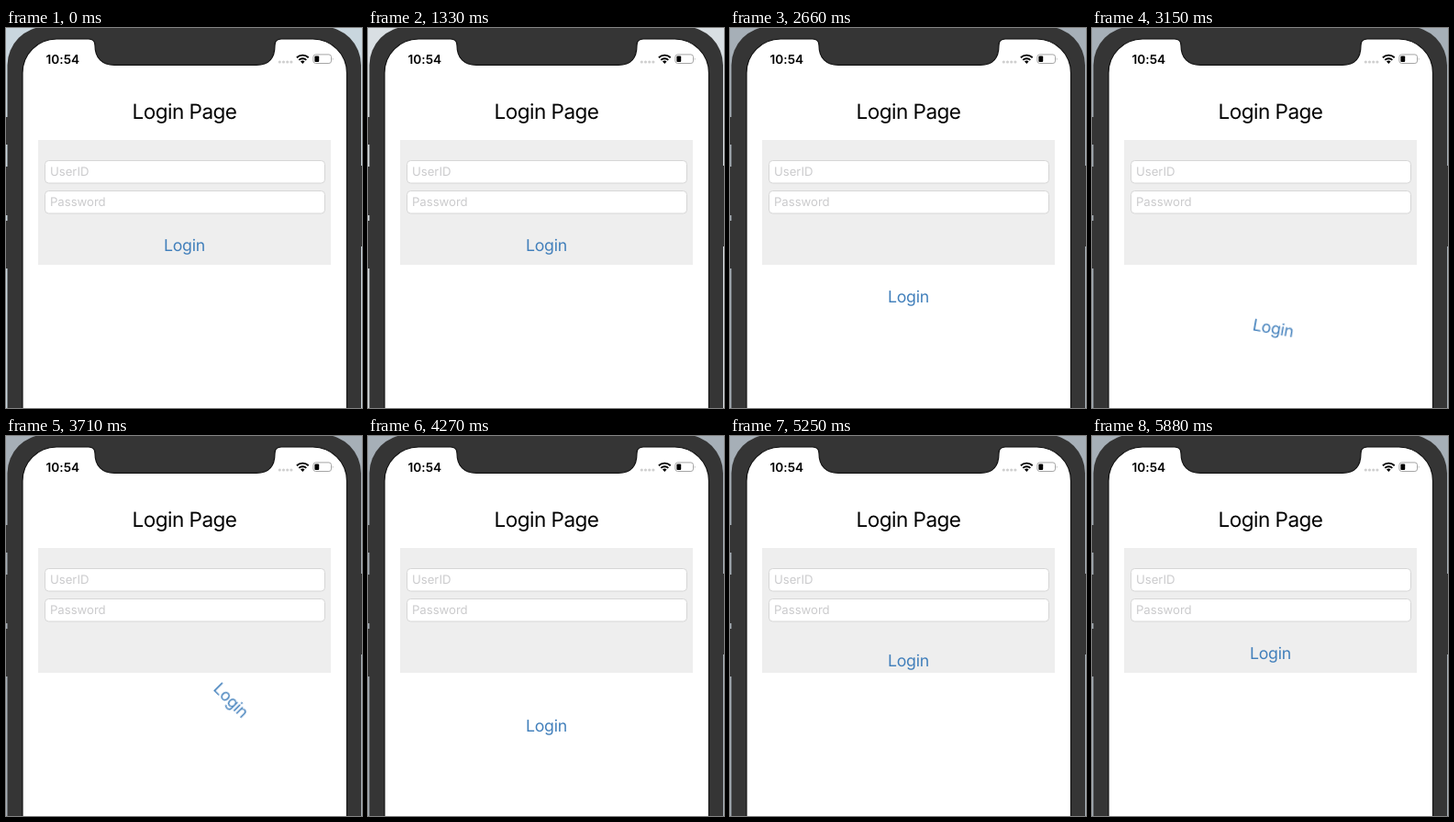
An HTML page for the animation above (6.65 s loop, 388 px wide and 414 px high).

```html
<!DOCTYPE html>
<html lang="en">
<head>
<meta charset="utf-8">
<title>Login button animation</title>
<style>
  html, body { margin: 0; width: 100%; height: 100%; overflow: hidden; background: #a6afb7; }
  svg { display: block; width: 388px; height: 414px; }
  text { font-family: Inter, "Liberation Sans", sans-serif; text-rendering: geometricPrecision; }
  .time { font-size: 13.6px; font-weight: 600; letter-spacing: .05px; }
  .title { font-size: 22.5px; letter-spacing: -.5px; text-anchor: middle; }
  .hint { font-size: 13.2px; letter-spacing: -.05px; fill: #cbcbcd; }
  .button { font-size: 17.7px; letter-spacing: -.25px; text-anchor: middle; fill: #417fbb; }
  .field { fill: #fff; stroke: #d6d6d6; }
</style>
</head>
<body>
<svg viewBox="0 0 388 414">
  <defs>
    <clipPath id="screen"><rect x="18" y="12" width="353.5" height="402"/></clipPath>
  </defs>

  <rect id="backdrop" width="388" height="414"/>

  <!-- phone body, side buttons, screen with notch -->
  <g fill="#353535">
    <rect x="1.5" y="-1.5" width="385.5" height="520" rx="42"/>
    <rect x="0" y="97" width="4" height="30"/>
    <rect x="0" y="151" width="4" height="53"/>
    <rect x="0" y="210" width="4" height="52"/>
    <rect x="385" y="150" width="3" height="88"/>
  </g>
  <path fill="#fff" stroke="#141414" stroke-width="1.200" d="M18 420V49A37 37 0 0 1 55 12H90Q97 12 97 19
    C97 33 105 40.300 118 40.300H273C286 40.300 293 33 293 19Q293 12 300 12H334.500A37 37 0 0 1 371.500 49V420Z"/>

  <!-- status bar -->
  <text class="time" x="43.500" y="39">10:54</text>
  <g fill="#d0d0d0">
    <circle cx="298.300" cy="37" r="1.600"/>
    <circle cx="302.500" cy="37" r="1.600"/>
    <circle cx="306.700" cy="37" r="1.600"/>
    <circle cx="310.900" cy="37" r="1.600"/>
  </g>
  <g fill="none" stroke="#000" stroke-width="1.900">
    <path d="M316.900 32.200A9.200 9.200 0 0 1 329.700 32.200"/>
    <path d="M319.300 34.900A5.600 5.600 0 0 1 327.300 34.900"/>
  </g>
  <path d="M323.300 39L321 36.600A3.300 3.300 0 0 1 325.600 36.600Z"/>
  <rect x="334.900" y="28.900" width="19.600" height="9.600" rx="2.600" fill="none" stroke="#a5a5a5"/>
  <rect x="336.400" y="30.400" width="4.800" height="6.600" rx="1"/>
  <path fill="#a5a5a5" d="M355.800 32Q357.400 33.700 355.800 35.400Z"/>

  <!-- form -->
  <text class="title" x="194.500" y="98.700">Login Page</text>
  <rect x="35" y="122" width="319" height="136" fill="#eee"/>
  <rect class="field" x="42.500" y="144.500" width="305" height="24.500" rx="4"/>
  <rect class="field" x="42.500" y="177.500" width="305" height="24.500" rx="4"/>
  <text class="hint" x="48" y="161.300">UserID</text>
  <text class="hint" x="48" y="194.300">Password</text>

  <g clip-path="url(#screen)">
    <g id="login"><text class="button" y="5">Login</text></g>
  </g>
</svg>
<script>
  const LOOP = 6650, TICK = 70, START = 1540, LENGTH = 4200;

  const pose = (offset, x, y, angle = 0) =>
    ({ offset, transform: `translate(${x}px, ${y}px) rotate(${angle}deg)` });

  // drop, tilt, fly off to the right, then rise back into place
  const move = document.getElementById('login').animate([
    pose(0, 194.4, 238.2),
    pose(.25, 194.4, 332.6),
    pose(.5, 207.5, 312.7, 45),
    pose(.74, 517, 112, 45),
    pose(.74, 194.4, 318),
    pose(1, 194.4, 238.2)
  ], { duration: LENGTH, easing: 'ease-in-out', fill: 'both' });
  move.pause();

  const backdrop = document.getElementById('backdrop');
  const shade = t => t < 1330 ? '#c9d6de' : t < 1400 ? '#d9dfe3' : '#a6afb7';

  function draw(now) {
    const t = Math.floor(now % LOOP / TICK) * TICK;
    move.currentTime = Math.min(Math.max(t - START, 0), LENGTH);
    backdrop.setAttribute('fill', shade(t));
  }

  const origin = performance.now();
  function frame() {
    draw(performance.now() - origin);
    requestAnimationFrame(frame);
  }
  frame();
</script>
</body>
</html>
```
